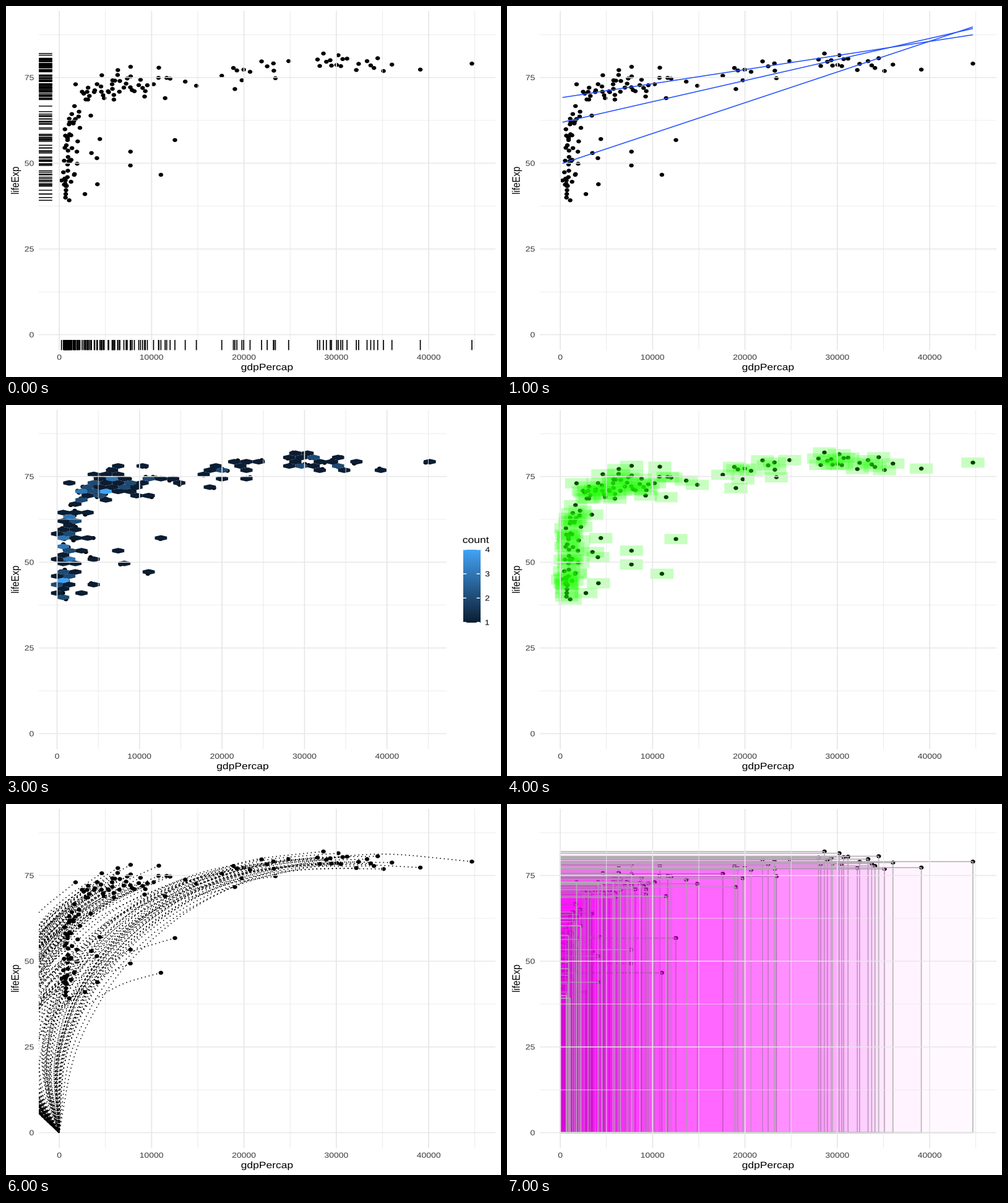
Recreate the animation shown at these times as a matplotlib script. Size 800 by 600 pixels, loop 8 s.

```python
import numpy as np
import matplotlib.pyplot as plt
from matplotlib.animation import FuncAnimation
from matplotlib.collections import LineCollection, PolyCollection
from matplotlib.colors import LinearSegmentedColormap
from matplotlib.patches import PathPatch
from matplotlib.textpath import TextPath
from matplotlib.transforms import Affine2D, Bbox, TransformedBbox

plt.rcParams["font.family"] = "Liberation Sans"
plt.rcParams["path.snap"] = False

GDP = np.array([
    727, 4604, 5288, 2773, 8798, 30688, 32418, 23404, 1136, 30486, 1373, 3413,
    6019, 11004, 8131, 7697, 1038, 446, 896, 1934, 33329, 739, 1156, 10779,
    3119, 5755, 1076, 241, 3484, 7723, 1649, 11628, 6341, 17596, 32167, 1908,
    4564, 5773, 4755, 5352, 7703, 765, 530, 28205, 28926, 12522, 661, 30036,
    1112, 22514, 4858, 946, 576, 1270, 3100, 30209, 14844, 31163, 1747, 2874,
    9241, 4391, 34077, 21906, 27968, 6995, 28605, 3845, 1288, 1647, 19234,
    35110, 9314, 1275, 531, 9535, 895, 665, 10207, 951, 1579, 9022, 10742,
    2141, 6557, 3258, 634, 611, 4072, 1057, 33725, 23190, 2475, 601, 1615,
    44684, 19775, 2093, 7356, 3784, 5909, 2651, 12002, 19971, 18856, 6316,
    7885, 786, 1353, 19015, 1520, 7236, 699, 36023, 13639, 20660, 882, 7711,
    24835, 3015, 1993, 4128, 29342, 34481, 4091, 23235, 899, 5913, 886, 11461,
    5723, 6508, 928, 29479, 39097, 7727, 8605, 1764, 4515, 2235, 1072, 672])
LIFE = np.array([
    42.13, 75.65, 70.99, 41.0, 74.34, 80.37, 78.98, 74.8, 62.01, 78.32, 54.41,
    63.88, 74.09, 46.63, 71.01, 72.14, 50.65, 47.36, 56.75, 49.86, 79.77,
    43.31, 50.53, 77.86, 72.03, 71.68, 62.97, 44.97, 52.97, 78.12, 46.83,
    74.88, 77.16, 75.51, 77.18, 53.37, 70.85, 74.17, 69.81, 70.73, 49.35,
    55.24, 50.73, 78.37, 79.59, 56.76, 58.04, 78.67, 58.45, 78.26, 68.98,
    53.68, 45.5, 58.14, 68.57, 81.5, 72.59, 80.5, 62.88, 68.59, 69.45, 57.05,
    77.78, 79.7, 80.24, 72.05, 82.0, 71.26, 50.99, 66.66, 77.05, 76.9, 71.03,
    44.59, 43.75, 72.74, 57.29, 45.01, 73.04, 51.82, 62.25, 71.95, 74.9,
    65.03, 73.98, 69.62, 44.03, 59.91, 51.48, 61.34, 78.53, 79.11, 70.84,
    54.5, 46.61, 79.05, 74.19, 63.61, 74.71, 70.76, 69.91, 70.3, 74.67, 77.29,
    77.78, 75.74, 71.32, 43.41, 64.34, 71.63, 61.6, 73.21, 41.01, 78.77, 73.8,
    76.66, 45.94, 53.37, 79.78, 70.82, 56.37, 43.87, 80.04, 80.62, 73.05,
    76.99, 49.65, 68.56, 57.56, 68.98, 73.04, 70.85, 47.81, 78.47, 77.31,
    75.31, 72.77, 73.02, 72.37, 60.31, 39.19, 39.99])

# The page is laid out in points and shown on an 800 x 600 stage.
PAGE_W, PAGE_H = 504, 440
SX, SY = 800 / PAGE_W, 600 / PAGE_H
LEFT, RIGHT, BOTTOM, TOP = 33.1, 498.5, 31.9, 434.5
GRID, LABEL, BLUE = "#e7e7e7", "#3b3b3b", "#2453ff"
BLUES = LinearSegmentedColormap.from_list("count", ["#0b1d32", "#43a3f5"])

fig = plt.figure(figsize=(8, 6), dpi=100, facecolor="white")
ax = fig.add_axes([0, 0, 1, 1])


def stroke(size, scale=(SX + SY) / 2):
    """Line width for a plot size in mm, at a given stage scale."""
    return size * 2.134 * scale * 72 / fig.dpi


def text(s, x, y, size, color="black", ha=0.5, angle=0):
    path = TextPath((0, 0), s, size=size)
    box = path.get_extents()
    move = Affine2D().translate(-box.x0 - ha * box.width, 0)
    path = move.rotate_deg(angle).translate(x, y).transform_path(path)
    ax.add_patch(PathPatch(path, fc=color, lw=0))


class Panel:
    def __init__(self, right=RIGHT):
        self.right = right
        self.clip = TransformedBbox(
            Bbox.from_extents(LEFT, BOTTOM, right, TOP), ax.transData)

    def x(self, v):
        return LEFT + (np.asarray(v) + 2250) / 49500 * (self.right - LEFT)

    def y(self, v):
        return BOTTOM + (np.asarray(v) + 4.5) / 99 * (TOP - BOTTOM)

    def add(self, coll):
        ax.add_collection(coll, autolim=False)
        coll.set_clip_box(self.clip)

    def lines(self, paths, lw, color="black", **kw):
        self.add(LineCollection(paths, linewidths=lw, colors=color, **kw))

    def vlines(self, xs, y0, y1, size, color="black"):
        self.lines([[(x, y0), (x, y1)] for x in xs], stroke(size, SX), color)

    def hlines(self, ys, x0, x1, size, color="black"):
        self.lines([[(x0, y), (x1, y)] for y in ys], stroke(size, SY), color)

    def polys(self, shapes, fill, **kw):
        self.add(PolyCollection(shapes, facecolors=fill, **kw))

    def boxes(self, x0, y0, x1, y1, fill, **kw):
        x0, y0, x1, y1 = np.broadcast_arrays(
            self.x(x0), self.y(y0), self.x(x1), self.y(y1))
        corners = [(x0, y0), (x0, y1), (x1, y1), (x1, y0)]
        self.polys(np.transpose(corners, (2, 0, 1)), fill, **kw)

    def base(self):
        xs, ys = np.arange(0, 40001, 10000), np.arange(0, 76, 25)
        self.hlines(self.y(ys + 12.5), LEFT, self.right, 0.25, GRID)
        self.vlines(self.x(xs + 5000), BOTTOM, TOP, 0.25, GRID)
        self.hlines(self.y(ys), LEFT, self.right, 0.5, GRID)
        self.vlines(self.x(xs), BOTTOM, TOP, 0.5, GRID)
        for v in xs:
            text(str(v), self.x(v), 20.5, 8.8, LABEL)
        for v in ys:
            text(str(v), 28.2, self.y(v) - 3.1, 8.8, LABEL, ha=1)
        text("gdpPercap", (LEFT + self.right) / 2, 8.1, 11)
        text("lifeExp", 13, (BOTTOM + TOP) / 2, 11, angle=90)
        a = np.linspace(0, 2 * np.pi, 33)
        disc = 2.35 * np.column_stack([np.cos(a), np.sin(a)])
        at = np.column_stack([self.x(GDP), self.y(LIFE)])
        self.polys(at[:, None] + disc, "black", linewidths=0)


def rug(p):
    p.vlines(p.x(GDP), BOTTOM, BOTTOM + 0.03 * (TOP - BOTTOM), 0.5)
    p.hlines(p.y(LIFE), LEFT, LEFT + 0.03 * (RIGHT - LEFT), 0.5)


def quantiles(p):
    # The best line for each quantile runs through two of the points.
    i, j = np.triu_indices(len(GDP), 1)
    keep = GDP[i] != GDP[j]
    i, j = i[keep], j[keep]
    slope = (LIFE[j] - LIFE[i]) / (GDP[j] - GDP[i])
    start = LIFE[i] - slope * GDP[i]
    res = LIFE - start[:, None] - slope[:, None] * GDP
    ends = np.array([GDP.min(), GDP.max()])
    for q in (0.25, 0.5, 0.75):
        k = np.maximum(q * res, (q - 1) * res).sum(axis=1).argmin()
        fit = start[k] + slope[k] * ends
        p.lines([np.column_stack([p.x(ends), p.y(fit)])], stroke(0.5), BLUE)


def smooth(p):
    n, mean = len(GDP), GDP.mean()
    b, a = np.polyfit(GDP, LIFE, 1)
    sxx = ((GDP - mean) ** 2).sum()
    sd = np.sqrt(((LIFE - a - b * GDP) ** 2).sum() / (n - 2))
    v = np.linspace(GDP.min(), GDP.max(), 80)
    fit = a + b * v
    err = 1.977 * sd * np.sqrt(1 / n + (v - mean) ** 2 / sxx)
    band = np.column_stack([np.r_[p.x(v), p.x(v[::-1])],
                            np.r_[p.y(fit + err), p.y((fit - err)[::-1])]])
    p.polys([band], "#898989", alpha=0.4, linewidths=0)
    p.lines([np.column_stack([p.x(v), p.y(fit)])], stroke(1), BLUE)


def hexes(p):
    bw, bh = np.ptp(GDP) / 30, np.ptp(LIFE) / 30
    x0, y0 = GDP.min() // bw * bw, LIFE.min() // bh * bh
    u, v = (GDP - x0) / bw, (LIFE - y0) / (bh * 3 ** 0.5)
    near = np.array([np.floor(u + 0.5), np.floor(v + 0.5)])
    mid = np.array([np.floor(u) + 0.5, np.floor(v) + 0.5])

    def dist(c):
        return (u - c[0]) ** 2 + 3 * (v - c[1]) ** 2

    cells = np.where(dist(near) <= dist(mid), near, mid).T
    cells, count = np.unique(cells, axis=0, return_counts=True)
    cx, cy = x0 + cells[:, :1] * bw, y0 + cells[:, 1:] * bh * 3 ** 0.5
    hx = p.x(cx + bw / 2 * np.array([1, 1, 0, -1, -1, 0]))
    hy = p.y(cy + bh * 0.2875 * np.array([1, -1, -2, -1, 1, 2]))
    top = count.max()
    p.polys(np.dstack([hx, hy]), BLUES((count - 1) / (top - 1)), linewidths=0)
    legend(p.right + 16.5, top)


def legend(x, top):
    low, height, width = 182.2, 86.4, 17.28
    text("count", x, 276.4, 11, ha=0)
    ax.imshow(np.linspace(0, 1, 256)[:, None], cmap=BLUES, origin="lower",
              extent=(x, x + width, low, low + height), aspect="auto")
    step = 1 if top <= 5 else 2
    for n in range(step, top + 1, step):
        y = low + (n - 1) / (top - 1) * height
        for a, b in ((0, 0.2), (0.8, 1)):
            ax.plot([x + a * width, x + b * width], [y, y], color="white",
                    lw=stroke(0.5, SY), solid_capstyle="butt")
        text(str(n), x + width + 5.5, y - 3.1, 8.8, ha=0)


def tiles(p):
    p.boxes(GDP - 1250, LIFE - 1.5, GDP + 1250, LIFE + 1.5, "#21ff06",
            alpha=0.25, linewidths=0)


def segments(p):
    home = (p.x(0), p.y(0))
    p.lines([[pt, home] for pt in zip(p.x(GDP), p.y(LIFE))], stroke(0.5),
            alpha=0.25)


def blend(num, den):
    u, q = num / den, 2 * den * den
    return u ** 3 * (10 - q + (2 * q - 15) * u + (6 - q) * u * u)


def xspline(pts, shape=0.5, steps=14):
    """Open X-spline through complex control points."""
    s = np.r_[0, np.full(len(pts) - 2, shape), 0]
    pts = np.r_[pts[0], pts, pts[-1]]
    t = np.linspace(0, 1, steps)
    out = []
    for k in range(len(s) - 1):
        a, b = s[k], s[k + 1]
        w = np.array([np.where(t < a, blend(t - a, -1 - a), 0),
                      blend(t - 1 - b, -1 - b),
                      blend(t + a, 1 + a),
                      np.where(t > 1 - b, blend(t - 1 + b, 1 + b), 0)])
        z = pts[k:k + 4] @ w / w.sum(axis=0)
        out.append(z if k == 0 else z[1:])
    z = np.concatenate(out)
    return np.column_stack([z.real, z.imag])


def curves(p):
    home = p.x(0) + 1j * p.y(0)
    turn = np.exp(1j * np.linspace(0, np.pi - 2 * np.arctan(0.75), 7))
    paths = []
    for z in p.x(GDP) + 1j * p.y(LIFE):
        hub = z + (home - z) / 2 * (1 + 0.75j)
        paths.append(xspline(hub + (z - hub) * turn))
    p.lines(paths, stroke(0.5), linestyles=[(0, (1, 3))])


def rects(p):
    p.boxes(0, 0, GDP, LIFE, (1, 0, 1, 0.025), edgecolors="#b2b2b2",
            linewidths=stroke(0.5))


SCENES = [rug, quantiles, smooth, hexes, tiles, segments, curves, rects]


def draw(i):
    ax.clear()
    ax.axis("off")
    ax.set_xlim(0, PAGE_W)
    ax.set_ylim(0, PAGE_H)
    scene = SCENES[i]
    panel = Panel(448.8 if scene is hexes else RIGHT)
    panel.base()
    scene(panel)
    ax.set_xlim(0, PAGE_W)
    ax.set_ylim(0, PAGE_H)
    return []


anim = FuncAnimation(fig, draw, frames=len(SCENES), interval=1000,
                     init_func=lambda: draw(0), repeat=True, repeat_delay=0)
plt.show()
```
